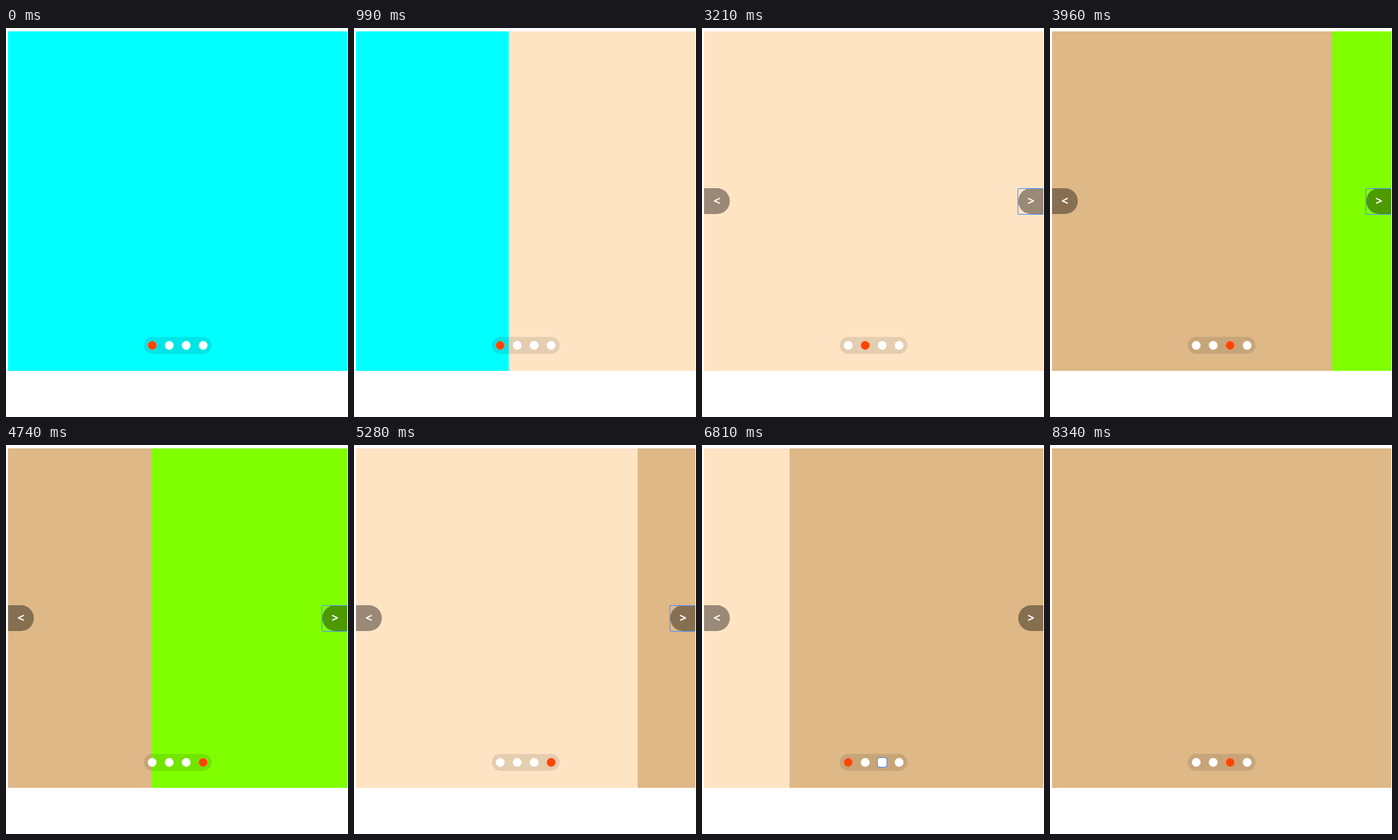
An HTML page that plays this animation: 504 by 573 pixels, repeating every 8430 ms.

```html
<!DOCTYPE html>
<html lang="en">
<head>
<meta charset="utf-8">
<title>Carousel</title>
<style>
  html, body {
    margin: 0;
    width: 100%;
    height: 100%;
    overflow: hidden;
    background: #fff;
  }

  .carousel {
    position: absolute;
    left: 3px;
    top: 5px;
    width: 500px;
    height: 500px;
    overflow: hidden;
  }
  .carousel * { position: absolute; box-sizing: border-box; }

  /* Every animation shares one loop and holds its value between keyframes */
  .track, .arrow, .marker, .ring, .target {
    animation: 8430ms step-end infinite;
  }

  .track { width: 2000px; height: 500px; animation-name: slide; }
  .track i { width: 500px; height: 500px; }
  .track i:nth-child(1) { left: 0; background: aqua; }
  .track i:nth-child(2) { left: 500px; background: bisque; }
  .track i:nth-child(3) { left: 1000px; background: burlywood; }
  .track i:nth-child(4) { left: 1500px; background: chartreuse; }

  .arrow {
    top: 231px;
    width: 38px;
    height: 38px;
    background: rgba(0, 0, 0, .4);
    color: #fff;
    font: bold 18px/36px "Noto Sans", sans-serif;
    text-align: center;
    animation-name: hover;
  }
  .prev { left: 0; border-radius: 0 19px 19px 0; }
  .next { left: 463px; border-radius: 19px 0 0 19px; }

  .dots {
    left: 200px;
    top: 450px;
    width: 100px;
    height: 25px;
    border-radius: 12.5px;
    background: rgba(0, 0, 0, .1);
  }
  .dots b {
    top: 6px;
    width: 13px;
    height: 13px;
    border-radius: 50%;
    background: #fff;
  }
  .dots b:nth-child(1) { left: 6px; }
  .dots b:nth-child(2) { left: 31px; }
  .dots b:nth-child(3) { left: 56px; }
  .dots b:nth-child(4) { left: 81px; }
  .dots .target { animation-name: square; }
  .dots .marker { background: orangered; animation-name: mark; }

  .ring {
    border: 1px solid #4d90fe;
    border-radius: 2px;
    visibility: hidden;
  }
  .next-ring { left: 462px; top: 231px; width: 39px; height: 39px; animation-name: focus-next; }
  .dot-ring { left: 55px; top: 5px; width: 15px; height: 15px; animation-name: focus-dot; }

  @keyframes slide {
    0% { left: 0; }
    9.2526% { left: -12.5px; animation-timing-function: steps(13); }
    13.8789% { left: -500px; }
    38.4341% { left: -512.5px; animation-timing-function: steps(14); }
    43.4163% { left: -1000px; }
    46.2633% { left: -1012.5px; animation-timing-function: steps(13); }
    50.8896% { left: -1500px; }
    54.4483% { left: -1483px; animation-timing-function: steps(38); }
    67.9715% { left: 0; }
    72.9537% { left: -19px; animation-timing-function: steps(25); }
    81.8505% { left: -991px; }
    82.2064%, 100% { left: -1000px; }
  }
  @keyframes mark {
    0% { left: 6px; border-radius: 50%; }
    13.8789% { left: 31px; border-radius: 50%; }
    43.4163% { left: 56px; border-radius: 50%; }
    50.8896% { left: 81px; border-radius: 50%; }
    67.9715% { left: 6px; border-radius: 50%; }
    82.2064% { left: 56px; border-radius: 3.5px; }
    98.9323%, 100% { left: 56px; border-radius: 50%; }
  }
  @keyframes square {
    0% { border-radius: 50%; }
    71.8861% { border-radius: 3.5px; }
    98.9323%, 100% { border-radius: 50%; }
  }
  @keyframes hover {
    0% { visibility: hidden; }
    21.3523% { visibility: visible; }
    86.8327%, 100% { visibility: hidden; }
  }
  @keyframes focus-next {
    0% { visibility: hidden; }
    38.0782% { visibility: visible; }
    71.8861%, 100% { visibility: hidden; }
  }
  @keyframes focus-dot {
    0% { visibility: hidden; }
    71.8861% { visibility: visible; }
    98.9323%, 100% { visibility: hidden; }
  }
</style>
</head>
<body>
<div class="carousel">
  <div class="track"><i></i><i></i><i></i><i></i></div>
  <div class="arrow prev">&lt;</div>
  <div class="arrow next">&gt;</div>
  <div class="ring next-ring"></div>
  <div class="dots">
    <b></b><b></b><b class="target"></b><b></b>
    <b class="marker"></b>
    <div class="ring dot-ring"></div>
  </div>
</div>
</body>
</html>
```
